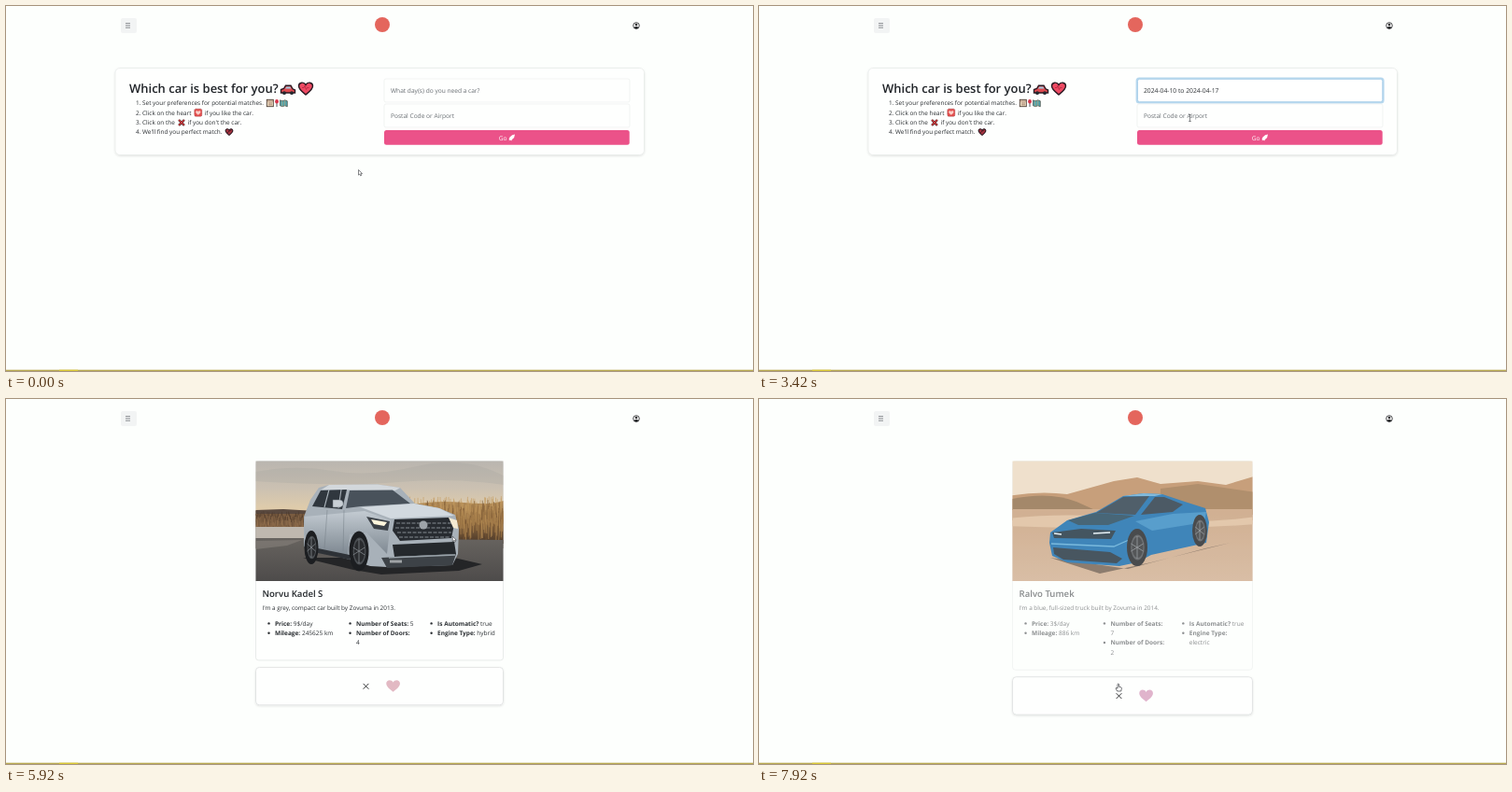
These frames come from a looping animation (800x391 px, 8000 ms). An HTML page:

```html
<!DOCTYPE html>
<html lang="en">
<head>
<meta charset="utf-8">
<title>Car match</title>
<style>
  html, body { margin: 0; width: 100%; height: 100%; overflow: hidden; background: #fdfffd; }
  svg { display: block; }
  text { font-family: "Open Sans", "Noto Sans", sans-serif; text-rendering: geometricPrecision; white-space: pre; }
</style>
</head>
<body>
<svg id="stage" width="100%" height="100%" viewBox="0 0 800 391">
  <defs>
    <linearGradient id="dusk" x2="0" y2="1">
      <stop offset="0" stop-color="#b9b5af"/><stop offset=".45" stop-color="#cbc1b2"/><stop offset="1" stop-color="#ecd2a6"/>
    </linearGradient>
    <linearGradient id="marsh" x2="0" y2="1">
      <stop offset="0" stop-color="#b38c58"/><stop offset=".5" stop-color="#8a673f"/><stop offset="1" stop-color="#4a3728"/>
    </linearGradient>
    <linearGradient id="road" x2="0" y2="1">
      <stop offset="0" stop-color="#67635f"/><stop offset="1" stop-color="#4d4b4a"/>
    </linearGradient>
    <linearGradient id="flank" x2="0" y2="1">
      <stop offset="0" stop-color="#c3cbd2"/><stop offset="1" stop-color="#7c868f"/>
    </linearGradient>
    <linearGradient id="sand" x2="0" y2="1">
      <stop offset="0" stop-color="#c69c77"/><stop offset="1" stop-color="#d0ae90"/>
    </linearGradient>
    <filter id="shadow" x="-5%" y="-10%" width="110%" height="125%">
      <feDropShadow dx="0" dy=".9" stdDeviation="1.1" flood-opacity=".12"/>
    </filter>
  </defs>
  <g id="header"></g>
  <g id="scene"></g>
</svg>
<script>
const LOOP = 8000, STEP = LOOP / 96;
const INK = '#2b2f33';
const $ = id => document.getElementById(id);

const rect = (x, y, w, h, fill, more = '') =>
  `<rect x="${x}" y="${y}" width="${w}" height="${h}" fill="${fill}" ${more}/>`;
const path = (d, fill, more = '') => `<path d="${d}" fill="${fill}" ${more}/>`;
const line = (d, color, width, more = '') =>
  path(d, 'none', `stroke="${color}" stroke-width="${width}" ${more}`);
const oval = (x, y, rx, ry, fill, more = '') =>
  `<ellipse cx="${x}" cy="${y}" rx="${rx}" ry="${ry}" fill="${fill}" ${more}/>`;
const text = (x, y, size, str, fill = INK, more = '') =>
  `<text x="${x}" y="${y}" font-size="${size}" fill="${fill}" ${more}>${str}</text>`;
const at = (x, y, body, scale = 1) => `<g transform="translate(${x} ${y}) scale(${scale})">${body}</g>`;

const HEART = 'M0 6.5C-3 4-7.5 1-7.5-2.7C-7.5-7-1.8-7.6 0-4C1.8-7.6 7.5-7 7.5-2.7C7.5 1 3 4 0 6.5Z';
const heart = (x, y, scale, fill, more = '') => at(x, y, path(HEART, fill, more), scale);
const outline = 'stroke="#2a1a22" stroke-width="1.4"';

// Header
$('header').innerHTML =
  rect(123, 13, 17, 16, '#f2f4f4', 'rx="2"') +
  line('M128 18.6h5M128 20.9h5M128 23.2h5', '#6f7276', .8) +
  oval(403, 20, 8, 8, '#e4665d') +
  oval(675, 21, 3.3, 3.3, '#fff', 'stroke="#1d1f21" stroke-width=".8"') +
  oval(675, 20, 1.3, 1.3, '#1d1f21') + path('M672.4 23.2Q675 20.6 677.6 23.2Q675 25.6 672.4 23.2', '#1d1f21') +
  rect(0, 389.7, 800, 1.3, '#b9aa51') + rect(57, 389.7, 20, 1.3, '#dbc935');

// Search form
const carIcon = at(302, 90,
  path('M-7.5 3V-.5L-4.5-1.5L-2.5-4.8H3L5-1.2L7.5 0V3Z', '#dd4a50', outline) +
  path('M-3-1.4L-1.7-3.6H2.2L3.4-1.4Z', '#9cc7dc') +
  oval(-4, 3.2, 1.9, 1.9, '#252a30') + oval(4, 3.2, 1.9, 1.9, '#252a30'));
const icons = carIcon + heart(321, 88.5, 1, '#ee4a63', outline) +
  line('M317 87.5h2l1-2l1.5 4l1-2h2', '#b4263f', .8) +
  rect(279.3, 100.3, 7, 7.4, '#efe0c4', 'stroke="#4c3c33" stroke-width=".9"') +
  line('M279.3 102h7M281 104h4M281 105.8h4', '#8a5d50', .7) +
  line('M290 104v4', '#45474d', .9) + oval(290, 102.2, 1.9, 2.2, '#d9344a') +
  path('M293.5 100.8l2.5 1l2.7-1l2.6 1v6l-2.6-1l-2.7 1l-2.5-1Z', '#4fa3ae', 'stroke="#4d4b43" stroke-width=".7"') +
  line('M296 101.8v6M298.7 101v6', '#d1a56a', .6) +
  rect(201.8, 110.2, 8, 8, '#e4504f', 'rx="1.5" stroke="#8c2b2f" stroke-width=".6" stroke-dasharray="1.2 .8"') +
  heart(205.8, 114.4, .35, '#fbd0c9') +
  line('M185.1 122l5.8 5.8M190.9 122l-5.8 5.8', '#331a1d', 2.4) +
  line('M185.1 122l5.8 5.8M190.9 122l-5.8 5.8', '#cf3c3f', 1.3) +
  heart(239, 135, .52, '#a93440', 'stroke="#2a1a22" stroke-width="2"') +
  line('M236.5 136l5-3.5', '#36161d', .8);

const steps = [
  [139, 106.3, '1.'], [146, 106.3, 'Set your preferences for potential matches.'],
  [139, 116.6, '2.'], [146, 116.6, 'Click on the heart'], [212.5, 116.6, 'if you like the car.'],
  [139, 126.9, '3.'], [146, 126.9, 'Click on the'], [194.5, 126.9, "if you don't the car."],
  [139, 137.2, '4.'], [146, 137.2, "We'll find you perfect match."]
].map(([x, y, str]) => text(x, y, 6.45, str)).join('');

function field(y, value, hint, focused) {
  const ring = focused
    ? rect(404.7, y - .5, 263.8, 26, 'none', 'rx="2.5" stroke="#b7d8ee" stroke-width="2.2"') +
      rect(405.5, y + .4, 262.2, 24.2, '#fff', 'rx="2" stroke="#8dbfe2" stroke-width=".6"')
    : rect(405, y, 263, 25, '#fefffe', 'rx="2" stroke="#edefee" stroke-width=".7"');
  return ring + (value ? text(412, y + 15.2, 6.75, value) : text(412, y + 15.2, 6.6, hint, '#686d72'));
}

function form(t) {
  const dates = t < 1330 ? '' : t < 2000 ? '2024-04-10' : '2024-04-10 to 2024-04-17';
  const code = 'A1B 2C3'.slice(0, Math.max(0, Math.floor((t - 4400) / 50)));
  const go = t > 4900 ? '#d4477a' : '#eb5289';
  return rect(117, 66.5, 566.5, 93, '#fefffe', 'rx="5" stroke="#e3e6e5" stroke-width=".6" filter="url(#shadow)"') +
    text(132, 92.5, 13, 'Which car is best for you?', '#212529', 'font-weight="600"') + steps + icons +
    field(78, dates, 'What day(s) do you need a car?', t >= 580 && t < 4250) +
    field(105, code, 'Postal Code or Airport', t >= 4250) +
    rect(405, 133, 262.7, 15.7, go, 'rx="2.5"') + text(527.8, 143.5, 6.6, 'Go', '#fff') +
    path('M538.5 143l1-2.5q2.5-3 5.5-3q0 3.3-3 5.6l-.8 1.4l-1-1l-1.7 1l.8-1.5Z', '#fff') +
    (t >= 660 && t < 2330 ? calendar(t) : '');
}

// Date picker
function month(x, name, firstDay, count, paint) {
  let out = text(x + 56.9, 116, 8, `<tspan font-weight="600">${name}</tspan><tspan font-weight="300"> 2024</tspan>`,
    '#33373b', 'text-anchor="middle"');
  ['Sun', 'Mon', 'Tue', 'Wed', 'Thu', 'Fri', 'Sat'].forEach((day, i) => {
    out += text(x + i * 18.95, 126.7, 5.3, day, '#62666a', 'text-anchor="middle" font-weight="700"');
  });
  for (let day = 1; day <= count; day++) {
    const cell = firstDay + day - 1;
    out += paint(day, x + cell % 7 * 18.95, 139.4 + Math.floor(cell / 7) * 17.2);
  }
  return out;
}

function calendar(t) {
  const picked = t >= 1330, ranged = t >= 1580, done = t >= 2000;
  const number = (day, x, y, fill = '#4a4d50') =>
    text(x, y + 2.2, 5.8, day, fill, 'text-anchor="middle"');
  const april = (day, x, y) => {
    let mark = '', fill = day < 9 ? '#f3f5f3' : undefined;
    const dot = (color, more) => oval(x, y, 8.4, 8.4, color, more);
    if (day === 9) mark = dot('none', 'stroke="#a3a8ad" stroke-width=".7"');
    if (ranged && day > 10 && day < 17) mark = rect(x - 9.5, y - 8.4, 19, 16.8, '#e6e7e6');
    if (day === 10 && t >= 1000) mark = dot(picked ? '#569ff7' : '#dcdedc');
    if (day === 17 && ranged) mark = dot(done ? '#569ff7' : '#dcdedc');
    if (day === 10 && picked || day === 17 && done) fill = '#fff';
    return mark + number(day, x, y, fill);
  };
  return rect(404.5, 103.5, 266.5, 113, '#fefffe', 'rx="2" stroke="#e2e5e3" stroke-width=".6" filter="url(#shadow)"') +
    path('M411.5 103.7l2.6-2.4l2.6 2.4', '#fefffe') +
    month(414.5, 'April', 1, 30, april) + month(547, 'May', 3, 31, number) +
    line('M661.8 111.2l3 2.9l-3 2.9', '#55595d', .9);
}

// Photos
const noise = n => { const v = Math.sin(n * 127.1) * 43758.5; return v - Math.floor(v); };

function reeds(x0, x1, top, height, color) {
  let d = '';
  for (let x = x0; x < x1; x += .9) {
    const y = top + noise(x) * height, lean = noise(x + 50) * 3 - 1.5;
    d += `M${x.toFixed(1)} ${(y + 4 + height * .7).toFixed(1)}l${lean.toFixed(1)} ${(-4 - height * .7).toFixed(1)}`;
  }
  return line(d, color, .6);
}
const wheel = (x, y, rx, ry) => oval(x, y, rx, ry, '#1c1e21') +
  oval(x + .5, y, rx * .66, ry * .68, '#4b4f53') + oval(x + .5, y, rx * .54, ry * .56, '#292b2e') +
  line(`M${x} ${y - ry * .6}V${y + ry * .6}M${x - rx * .6} ${y - 4}L${x + rx * .6} ${y + 4}M${x + rx * .6} ${y - 4}L${x - rx * .6} ${y + 4}`, '#85898e', .8);

const greyCar =
  rect(267, 66, 266, 65, 'url(#dusk)') +
  path('M267 78Q310 70 350 77T440 72T533 82V92Q480 84 420 89T267 88Z', '#a19e9b', 'opacity=".25"') +
  rect(267, 120, 266, 40, '#8a8178') + path('M267 119l30-1l35 2v5h-65Z', '#59493f') +
  path('M267 123h60v14h-60Z', '#7a5c40') + reeds(267, 324, 120, 9, '#4d392b') + reeds(267, 324, 124, 9, '#987551') +
  rect(267, 137, 60, 12, '#bfb8af') +
  path('M430 114Q460 108 490 111T533 109V155H430Z', 'url(#marsh)') +
  reeds(432, 533, 104, 16, '#c39a61') + reeds(432.4, 533, 108, 24, '#7b5833') + reeds(432.2, 533, 112, 22, '#b88d54') +
  path('M267 149H320L533 151V196H267Z', 'url(#road)') +
  path('M267 152l50-1l-16 6l-34 4Z', '#8d8882', 'opacity=".5"') +
  path('M318 170L372 183L402 188L485 184L510 177L480 170Z', '#242527') +
  path('M319 126L326 108L335 95L346 92L398 91.5L422 95L438 112L464 117L481 124L485 139L484 166L478 178L408 180L390 179L368 172L334 163L319 158Z', '#a8b1b9') +
  path('M346 92L398 91.5L422 95L417 98L338 97Z', '#d3d8dc') +
  path('M328 115L337 98L365 97L360 118Z', '#30373e') + line('M346 97L341 116M359 97l-3 20', '#aab3ba', 1.1) +
  path('M368 98L414 97.5L433 112L380 115L364 117Z', '#49525b') +
  path('M380 116L437 112L464 117L480 125L412 128Z', '#d2d9df') +
  path('M320 126L384 120L412 130L408 166L386 143L368 145L366 168L334 163L332 148L320 146Z', 'url(#flank)') +
  line('M344 119L341 160M362 119L361 163', '#747e86', .5) +
  path('M334 160L368 167V172L334 165Z', '#2e3237') +
  path('M350 108h8q4 1 3 6l-3 2h-8Z', '#c9d0d6', 'stroke="#5d666e" stroke-width=".5"') +
  path('M416 129L474 127L480 134L477 149L422 152L414 141Z', '#272b30') +
  line('M418 133h60M417 138h61M419 143h58M421 148h55', '#8f969c', .9, 'stroke-dasharray="4 1.5"') +
  oval(447, 135, 4.5, 4.5, '#9ea4a9') +
  path('M386 126L411 131L409 141L394 139Z', '#3b4147') + path('M391 129L408 132L405 136L394 134Z', '#fff6dc') +
  path('M474 127L483 130L484 139L479 138Z', '#f5ead2') +
  path('M414 156L480 153L482 166L416 169Z', '#25292d') +
  path('M402 170L482 166L478 178L408 181Z', '#3d4247') + line('M410 170L481 167', '#9aa3aa', 1.4) +
  rect(411, 172.5, 13, 3, '#9fa3a6') +
  wheel(327, 159, 7.5, 18) + wheel(378, 163, 10.5, 21.5);

const blueCar =
  rect(267, 66, 266, 130, '#ecd9c0') +
  path('M267 104Q300 98 330 102L380 88L405 84L430 91L470 88L500 92L533 82V130H267Z', '#ba875a') +
  path('M430 96L470 91L533 100V124H430Z', '#9d7349') + path('M267 108Q310 98 340 110L360 119H267Z', '#8e6a45') +
  rect(267, 118, 266, 78, 'url(#sand)') + path('M267 128Q330 121 400 128T533 126V134Q430 142 267 136Z', '#ddbb98') +
  path('M312 170L395 182L478 160L505 154L420 175L365 187Z', '#705b4a') +
  path('M312 143L330 130L361 121L390 104L412 101L432 102L456 110L478 117L482 132L479 154L420 167L405 175L386 179L330 175L314 168L311 154Z', '#0f66a8') +
  path('M361 122L390 105L418 104L403 124Z', '#253745') + path('M409 124L424 105L434 105L454 113L443 121Z', '#20313f') +
  path('M331 130L360 122L402 125L374 135L342 135Z', '#1a4056') +
  path('M390 104L412 101L432 102L424 104Z', '#64a9d2') +
  path('M403 131L443 123L479 121L477 132L421 141Z', '#2f86c0') +
  path('M314 143L345 139L382 141L377 150L316 149Z', '#152a39') +
  line('M316 144l8 1M358 144l18-1', '#e4f1f7', 1.7) +
  path('M315 159L376 164L389 171L383 176L326 172L316 166Z', '#1a2b38') +
  line('M313 155L380 158L396 151', '#59a9d6', 1.3) +
  wheel(405, 159, 11, 20) + wheel(472, 141, 8, 17);

// Result cards
const cards = [
  { photo: greyCar, title: 'Norvu Kadel S', about: "I'm a grey, compact car built by Zovuma in 2013.", rows: 3, columns: [
    [['Price:', '9$/day'], ['Mileage:', '245625 km']],
    [['Number of Seats:', '5'], ['Number of Doors:', ''], ['', '4']],
    [['Is Automatic?', 'true'], ['Engine Type:', 'hybrid']]] },
  { photo: blueCar, title: 'Ralvo Tumek', about: "I'm a blue, full-sized truck built by Zovuma in 2014.", rows: 4, columns: [
    [['Price:', '3$/day'], ['Mileage:', '886 km']],
    [['Number of Seats:', ''], ['', '7'], ['Number of Doors:', ''], ['', '2']],
    [['Is Automatic?', 'true'], ['Engine Type:', ''], ['', 'electric']]] }
];

function result(card, shown, tint) {
  const width = 265 * (.935 + .065 * shown), left = 400 - width / 2;
  const bottom = 249 + 10.3 * card.rows, middle = bottom + 27.9;
  let body = rect(left, 66.5, width, bottom - 66.5, '#fefffe', 'rx="3" stroke="#dfe2e1" stroke-width=".7"') +
    text(left + 7, 212.3, 9.6, card.title, '#212529', 'font-weight="600"') +
    text(left + 7, 225.6, 6.4, card.about);
  card.columns.forEach((entries, c) => entries.forEach(([label, value], r) => {
    const x = left + 20.5 + c * width * .3285, y = 242.6 + r * 10.3;
    if (label) body += oval(x - 6.5, y - 2.2, 1.2, 1.2, INK);
    body += text(x, y, 6.5, label ? `<tspan font-weight="700">${label}</tspan> ${value}` : value);
  }));
  return `<g opacity="${shown}">${body}</g>` +
    `<svg x="${left}" y="66.5" width="${width}" height="128.5" viewBox="267.5 66.5 265 128.5"
      preserveAspectRatio="xMidYMid slice" opacity="${Math.min(1, shown * 1.5)}">${card.photo}</svg>` +
    rect(left, bottom + 7.5, width, 40.4, '#fefffe', 'rx="4" stroke="#d9dcdb" stroke-width=".7" filter="url(#shadow)"') +
    line(`M382.6 ${middle - 2.9}l5.8 5.8m0-5.8l-5.8 5.8`, '#1c1e20', .9) +
    heart(414.6, middle - .3, .98, tint);
}

function match(t) {
  const tint = t < 5900 ? '#e3bbdc' : t < 6700 ? '#e2b9c3' : '#e0b4cc';
  if (t < 5300) return result(cards[0], Math.min(1, .5 + (t - 5083) / 330), tint);
  if (t < 7800) return result(cards[0], Math.max(.25, 1 - Math.max(0, t - 7584) / 250), tint);
  return result(cards[1], .28 + (t - 7833) / 333, tint);
}

// Pointer
const shapes = {
  arrow: path('M0 0V5.6L1.3 4.5L2.2 6.4L3.2 5.9L2.3 4.1H4Z', '#fff', 'stroke="#33363a" stroke-width=".6"'),
  beam: line('M-1.3-3.5H1.3M0-3.5V3.5M-1.3 3.5H1.3', '#55585c', .7),
  hand: path('M-1-3.5q.8-.9 1.5 0V-.8l2.4.7q.7.3.4 1.5L2.7 4H-1.3L-3 1q.2-1 1.2-.5l.8.6Z', '#fff', 'stroke="#33363a" stroke-width=".7"')
};
const moves = [
  [0, 377.5, 175.5, 'arrow'], [250, 377.5, 175.5, 'arrow'], [580, 462, 93, 'beam'], [750, 462, 93, 'arrow'],
  [1080, 462, 154, 'arrow'], [1330, 462, 154, 'arrow'], [1670, 468, 171, 'arrow'], [2580, 468, 171, 'arrow'],
  [3250, 461.5, 120, 'beam'], [4650, 461.5, 120, 'beam'], [4900, 471, 142, 'hand'], [5080, 471, 139, 'arrow'],
  [5830, 471, 139, 'arrow'], [6170, 516, 189, 'arrow'], [6500, 434, 240.3, 'beam'], [6670, 434, 240.3, 'arrow'],
  [7170, 385, 309, 'hand'], [8000, 385, 309, 'hand']
];

function pointer(t) {
  const next = moves.findIndex(move => move[0] > t);
  const [t0, x0, y0, shape] = moves[next - 1], [t1, x1, y1] = moves[next];
  const p = (t - t0) / (t1 - t0), ease = p * p * (3 - 2 * p);
  return at(x0 + (x1 - x0) * ease, y0 + (y1 - y0) * ease, shapes[shape]);
}

let last = -1;
function tick() {
  const step = Math.floor((performance.now() % LOOP + 5) / STEP) % 96;
  if (step !== last) {
    const t = step * STEP;
    $('scene').innerHTML = (t < 5080 ? form(t) : match(t)) + pointer(t);
    last = step;
  }
  requestAnimationFrame(tick);
}
tick();
</script>
</body>
</html>
```
